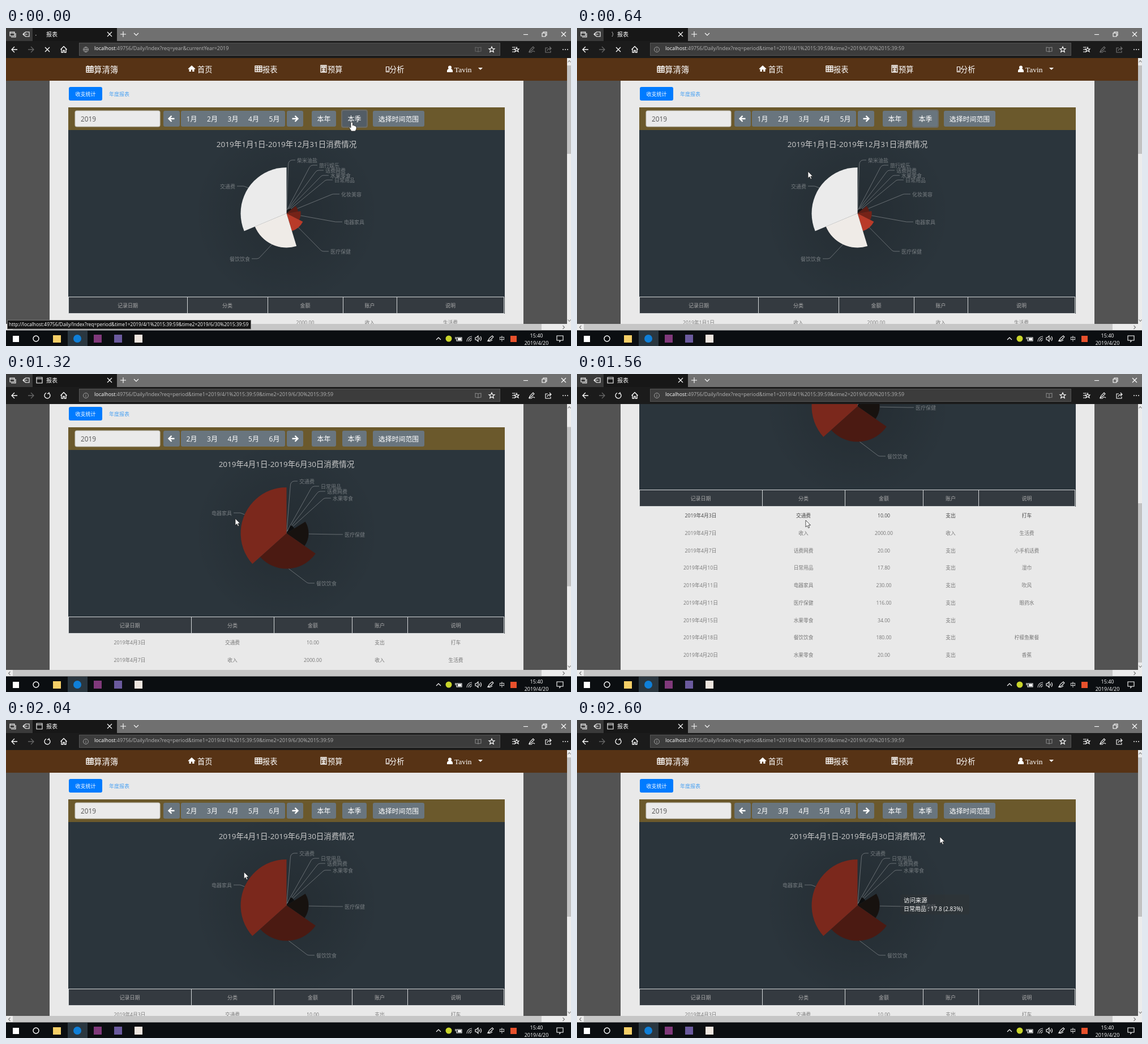
An HTML page with a canvas that plays this animation: 998 by 561 pixels, repeating every 2640 ms.

```html
<!DOCTYPE html>
<html lang="zh-CN">
<head>
<meta charset="utf-8">
<title>报表</title>
<style>
html, body { margin: 0; width: 100%; height: 100%; overflow: hidden; background: #000; }
canvas { display: block; }
</style>
</head>
<body>
<canvas id="stage" width="998" height="561"></canvas>
<script>
const ctx = document.getElementById('stage').getContext('2d');
const LOOP = 2640, LOADED = 880;
const SANS = '"Open Sans", "Noto Sans CJK SC", "Noto Sans CJK", sans-serif';
const SERIF = '"Liberation Serif", serif';
const HOST = 'localhost', PATH = ':49756/Daily/Index?req=';
const PERIOD = 'period&time1=2019/4/1%2015:39:59&time2=2019/6/30%2015:39:59';

// Slice: name, value, colour, label x, label y
const year = {
  title: '2019年1月1日-2019年12月31日消费情况', first: 1, thumb: 156,
  columns: [110, 320, 462, 595, 690, 880],
  rows: ['2019年1月1日 收入 2000.00 收入 生活费'],
  slices: [
    ['柴米油盐', 1.5, '#101214', 514, 233], ['旅行娱乐', 9, '#101214', 553, 242],
    ['话费网费', 11, '#101214', 564, 251], ['水果零食', 13, '#101214', 573, 260],
    ['日常用品', 16.5, '#1a1110', 580, 268], ['化妆美容', 30, '#5c1d15', 592, 293],
    ['电器家具', 36, '#752318', 597, 342], ['医疗保健', 46, '#b93b29', 573, 394],
    ['餐饮饮食', 84.4, '#efebe7', 431, 407], ['交通费', 112.6, '#ebebeb', 405, 279]]
};
const quarter = {
  title: '2019年4月1日-2019年6月30日消费情况', first: 2, thumb: 281,
  columns: [110, 327, 473, 611, 709, 880],
  rows: ['2019年4月3日 交通费 10.00 支出 打车', '2019年4月7日 收入 2000.00 收入 生活费',
    '2019年4月7日 话费网费 20.00 支出 小手机话费', '2019年4月10日 日常用品 17.80 支出 湿巾',
    '2019年4月11日 电器家具 230.00 支出 吹风', '2019年4月11日 医疗保健 116.00 支出 眼药水',
    '2019年4月15日 水果零食 34.00 支出', '2019年4月18日 餐饮饮食 180.00 支出 柠檬鱼聚餐',
    '2019年4月20日 水果零食 20.00 支出 香蕉'],
  slices: [
    ['交通费', 10, '#0c0e10', 518, 235], ['日常用品', 17.8, '#0c0e10', 556, 244],
    ['话费网费', 20, '#0c0e10', 567, 253], ['水果零食', 54, '#0d0e0f', 577, 265],
    ['医疗保健', 116, '#17120f', 598, 329], ['餐饮饮食', 180, '#4b1a12', 548, 415],
    ['电器家具', 230, '#7b281c', 399, 291]],
  delays: [10, 45, 20, 40, 36, 0, 36]
};

// Keyframes: time followed by values
const cursorKeys = [[200, 611, 166], [480, 408, 253], [1200, 408, 253], [1320, 405, 255], [1560, 404, 258],
  [1800, 404, 258], [2040, 420, 268], [2320, 507, 315], [2400, 515, 308], [2600, 641, 206]];
const scrollKeys = [[1240, 0], [1300, 46], [1345, 46], [1490, 270], [1720, 270], [1940, 0]];

function track(keys, t) {
  const next = keys.findIndex(k => k[0] > t);
  if (next < 0) return keys[keys.length - 1].slice(1);
  if (next === 0) return keys[0].slice(1);
  const a = keys[next - 1], b = keys[next], p = (t - a[0]) / (b[0] - a[0]);
  return a.slice(1).map((v, i) => v + (b[i + 1] - v) * p);
}

function elasticOut(k) {
  if (k <= 0) return 0;
  return k >= 1 ? 1 : 1 + 2 ** (-10 * k) * Math.sin((k - .1) * 5 * Math.PI);
}

function rect(x, y, w, h, color, radius = 0) {
  ctx.fillStyle = color;
  ctx.beginPath();
  ctx.roundRect(x, y, w, h, radius);
  ctx.fill();
}

function disc(x, y, r, color) {
  ctx.fillStyle = color;
  ctx.beginPath();
  ctx.arc(x, y, r, 0, 7);
  ctx.fill();
}

// y is the vertical middle of the glyphs
function text(s, x, y, size, color, align = 'center', weight = 400, family = SANS) {
  ctx.font = `${weight} ${size}px ${family}`;
  ctx.textAlign = align;
  ctx.fillStyle = color;
  ctx.fillText(s, x, y + size * .39);
}

function icon(x, y, d, color = '#fff', width = 1.1, fill = false) {
  ctx.save();
  ctx.translate(x, y);
  ctx.strokeStyle = ctx.fillStyle = color;
  ctx.lineWidth = width;
  ctx[fill ? 'fill' : 'stroke'](new Path2D(d));
  ctx.restore();
}

const CROSS = 'M-4-4L4 4M4-4L-4 4';
const ARROW = 'M5 0H-5M0-5L-5 0L0 5';
const ARROW_RIGHT = 'M-5 0H5M0-5L5 0L0 5';
const GRID = 'M-6-5H6V5H-6ZM-6-2H6M-6 1.5H6M-2-5V5M2-5V5';
const STAR = 'M0-5L1.5-1.6L5-1.4L2.3.9L3.2 4.5L0 2.5L-3.2 4.5L-2.3.9L-5-1.4L-1.5-1.6Z';
const HOME = 'M-5.5 0L0-5.5L5.5 0M-4-1V5H-1.2V1.5H1.2V5H4V-1';

function drawNav() {
  rect(0, 53, 991, 40, '#573315');
  icon(148, 73, GRID + 'M-3.5-7V-4M3.5-7V-4', '#fff', 1.3);
  text('算清簿', 155, 73, 14.4, '#fff', 'left', 500);
  icon(328, 72, 'M-6.5 0L0-6L6.5 0L5.5 1L4.5 0V5H1.2V1.5H-1.2V5H-4.5V0L-5.5 1Z', '#fff', 1, true);
  icon(446, 72, GRID, '#fff', 1.3);
  icon(561, 72, 'M-5-6H5V6H-5ZM-3-4H3V-2H-3ZM-3 1H3M-3 4H3M0-1V5', '#fff', 1.3);
  icon(674, 73, 'M-2.5-4.5H2.5V4.5H-2.5ZM-1 2.8H1', '#fff', 1.2);
  [['首页', 338], ['报表', 453], ['预算', 568], ['分析', 677]].forEach(([s, x]) => text(s, x, 72.5, 13.2, '#fff', 'left'));
  disc(784, 69.5, 3, '#fff');
  icon(784, 73, 'M-5 5V2Q-4-1-2-1H2Q4-1 5 2V5Z', '#fff', 1, true);
  text('Tavin', 792, 72.5, 13.5, '#fff', 'left', 400, SERIF);
  icon(838, 72, 'M-4-2H4L0 2Z', '#fff', 1, true);
}

function button(x, w, label, size = 12, color = '#69757e') {
  rect(x, 146, w, 28, color, 3);
  text(label, x + w / 2, 160, size, '#fff');
}

function drawToolbar(page, hover) {
  rect(111, 104, 59, 24, '#007bff', 3);
  text('收支统计', 140.5, 116, 9, '#fff');
  text('年度报表', 182, 116, 9, '#48a0f2', 'left', 300);
  rect(110, 140, 771, 40, '#6b592c');
  rect(121.5, 145.5, 151, 29, '#c5c5c0', 3.5);
  rect(122.5, 146.5, 149, 27, '#eaeaea', 3);
  text('2019', 132, 160, 11.8, '#555', 'left');
  button(278, 29, '');
  icon(292.5, 160, ARROW, '#fff', 2.4);
  button(309, 184, '');
  for (let i = 0; i < 5; i++) text(page.first + i + '月', 328 + i * 36.5, 160, 12, '#fff');
  button(496, 29, '');
  icon(510.5, 160, ARROW_RIGHT, '#fff', 2.4);
  button(540, 43, '本年');
  if (page === year) rect(592, 144, 47, 32, 'rgba(108,117,135,.65)', 4);
  button(594, 43, '本季', 12, hover ? '#535d66' : '#69757e');
  button(648, 91, '选择时间范围', 11.9);
}

function drawChart(page, t) {
  const cx = 495.5, cy = 327, { slices } = page;
  rect(110, 180, 771, 294, '#2b353c');
  const halo = ctx.createRadialGradient(cx, cy, 40, cx, cy, 165);
  halo.addColorStop(0, 'rgba(0,0,0,.13)');
  halo.addColorStop(1, 'rgba(0,0,0,0)');
  rect(320, 180, 350, 294, halo);
  text(page.title, cx, 205, 13.5, '#ccc');

  const values = slices.map(s => s[1]);
  const total = values.reduce((a, b) => a + b), min = values[0], max = values[values.length - 1];
  let angle = -Math.PI / 2;
  const wedges = slices.map(([name, value, color, x, y], i) => {
    const start = angle, radius = (value - min) / (max - min) * 81;
    angle += value / total * 2 * Math.PI;
    const mid = (start + angle) / 2, side = Math.cos(mid) < -.1 ? -1 : 1;
    ctx.strokeStyle = 'rgba(255,255,255,.3)';
    ctx.lineWidth = 1;
    ctx.beginPath();
    ctx.moveTo(cx + radius * Math.cos(mid), cy + radius * Math.sin(mid));
    ctx.arcTo(x - side * 15, y, x - side * 3, y, 7);
    ctx.lineTo(x - side * 3, y);
    ctx.stroke();
    text(name, x, y, 9, 'rgba(255,255,255,.36)', side < 0 ? 'right' : 'left');
    const grow = page.delays ? elasticOut((t - LOADED - page.delays[i]) / 400) : 1;
    return { start, end: angle, radius: radius * grow, color };
  });
  for (const w of wedges) {
    ctx.fillStyle = w.color;
    ctx.beginPath();
    ctx.moveTo(cx, cy);
    ctx.arc(cx, cy, w.radius, w.start, w.end);
    ctx.fill();
  }
}

function drawTable(page, hover) {
  const cols = page.columns, center = i => (cols[i] + cols[i + 1]) / 2;
  rect(110, 474, 771, 30, '#343a40');
  ctx.strokeStyle = '#d4d7d9';
  ctx.lineWidth = 1;
  ctx.strokeRect(110.5, 474.5, 769, 29);
  cols.slice(1, 5).forEach(x => rect(x, 474, 1, 30, '#d4d7d9'));
  ['记录日期', '分类', '金额', '账户', '说明'].forEach((s, i) => text(s, center(i), 489, 9, '#aaa', 'center', 500));
  page.rows.forEach((row, r) => row.split(' ').forEach((s, i) =>
    text(s, center(i), 520 + r * 30.7, 8.7, r === 0 && hover ? '#444' : '#777')));
}

function drawTooltip(t) {
  if (t < 2400) return;
  ctx.globalAlpha = Math.min(1, (t - 2400) / 80);
  rect(571, 308, 122, 35, 'rgba(50,50,50,.35)', 3);
  text('访问来源', 577, 318, 10.4, '#fff', 'left');
  text('日常用品 : 17.8 (2.83%)', 577, 333, 10, '#fff', 'left');
  ctx.globalAlpha = 1;
}

function drawPage(page, t, scroll) {
  ctx.save();
  ctx.beginPath();
  ctx.rect(0, 53, 991, 469);
  ctx.clip();
  rect(0, 53, 991, 469, '#535353');
  ctx.translate(0, -scroll);
  rect(77, 93, 837, 740, '#e9e9e9');
  drawNav();
  drawToolbar(page, t < 260);
  drawChart(page, t);
  drawTable(page, scroll === 270);
  drawTooltip(t);
  ctx.restore();

  rect(991, 53, 7, 480, '#ececec');
  rect(991, 66 + scroll * .6, 7, page.thumb, '#c2c2c2');
  icon(995, 59, 'M-2.5 1.5L0-1.5L2.5 1.5', '#777');
  icon(995, 516, 'M-2.5-1.5L0 1.5L2.5-1.5', '#777');
  rect(0, 522, 998, 11.5, '#ececec');
  rect(12, 522, 934, 11.5, '#c6c6c6');
  icon(6, 528, 'M1.5-3L-1.5 0L1.5 3', '#777');
  icon(985, 528, 'M-1.5-3L1.5 0L-1.5 3', '#777');
}

function drawTabBar(t) {
  rect(0, 0, 998, 23, '#707070');
  rect(0, 0, 47, 23, '#3a3a3a');
  rect(47, 0, 149, 23, '#171717');
  icon(12, 11, 'M-5-4H3V3H-5ZM-3 5H5V-2M-5-2H3');
  icon(36, 11, 'M-2-4H5V4H-2M-2-4V-2M-2 4V2M2 0H-6M-3-3L-6 0L-3 3');
  if (t < 1100) {
    const count = t < 300 ? 1 : t < LOADED ? 4 : 6;
    for (let i = 0; i < count; i++) {
      const a = 2.8 + t / 230 + i * (t < LOADED ? .45 : .95);
      disc(58 + 5.5 * Math.cos(a), 11 + 5.5 * Math.sin(a), .8, '#ccc');
    }
  } else icon(59, 11, 'M-5-5H5V5H-5ZM-5-2.5H5');
  text('报表', 71, 11, 10, '#fff', 'left');
  icon(183, 11, CROSS);
  icon(207, 11, 'M-5 0H5M0-5V5');
  icon(230, 11, 'M-4-2L0 2L4-2');
  icon(918, 11, 'M-4 .5H4');
  icon(951, 11, 'M-4-2H2V4H-4ZM-2-2V-4H4V2H2');
  icon(985, 11, CROSS);
}

function drawAddressBar(t) {
  const loaded = t >= LOADED, started = t >= 320;
  rect(0, 23, 998, 30, '#1b1b1b');
  rect(129, 26, 744, 23, '#555');
  rect(130, 27, 742, 21, '#3c3c3c');
  icon(15, 38, ARROW, '#fff', 1.3);
  icon(44, 38, ARROW_RIGHT, '#666', 1.3);
  icon(73, 38, loaded ? 'M3-4A5 5 0 1 1-2-4.6M3-6V-3.5H0' : CROSS, '#fff', 1.3);
  icon(102, 38, HOME, '#fff', 1.3);
  icon(141, 38, 'M4.5 0A4.5 4.5 0 1 1-4.5 0A4.5 4.5 0 1 1 4.5 0' +
    (started ? 'M0-.5V2.5M0-2.6V-1.6' : 'M-4.5 0H4.5M0-4.5Q-4 0 0 4.5Q4 0 0-4.5'), '#aaa', .9);
  text(HOST, 156, 36, 8.95, '#fff', 'left');
  const hostWidth = ctx.measureText(HOST).width;
  text(PATH + (started ? PERIOD : 'year&currentYear=2019'), 156 + hostWidth, 36, 8.95, '#b4b4b4', 'left');
  icon(834, 38, 'M0-3V4M0-3Q-2-4-5-4V3Q-2 3 0 4Q2 3 5 3V-4Q2-4 0-3', started ? '#888' : '#666');
  icon(858, 38, STAR, '#fff', 1.2);
  icon(900, 38, 'M-6-4H0M-6 0H-1M-6 4H-1M2-4L3-1H6L4 1L5 4L2 2L-1 4L0 1L-2-1H1Z');
  const side = loaded ? '#fff' : '#777';
  icon(929, 38, 'M-5 4L-3 0L2-5L4-3L-1 2ZM-5 5H-1Q2 1 5 4', side);
  icon(958, 38, 'M-1-3H-5V5H4V2M-2 2Q-1-2 5-2M2-5L5-2L2 1', side);
  [-4, 0, 4].forEach(dx => disc(988 + dx, 38, .9, '#fff'));
}

function drawTaskbar() {
  rect(0, 533.5, 998, 28, '#0b0e11');
  rect(109, 534, 35, 27, '#2a3740');
  rect(12, 543, 11, 11, '#fff');
  icon(53, 548, 'M5 0A5 5 0 1 1-5 0A5 5 0 1 1 5 0', '#fff', 1.4);
  rect(83, 542, 14, 13, '#f5cf67');
  disc(126, 548, 7, '#0f7fd8');
  rect(155, 541, 14, 14, '#80397b');
  rect(191, 541, 14, 14, '#6b5a9e');
  rect(227, 541, 14, 14, '#eee6df');
  icon(764, 548, 'M-4 2L0-2L4 2');
  disc(782, 548, 5.5, '#c9d52b');
  icon(800, 549, 'M-4-3H5V3H-4ZM-6-4V0');
  rect(798, 547, 6, 4, '#fff');
  icon(818, 548, 'M-4 5A9 9 0 0 1 5-4M-1 5A6 6 0 0 1 5-1M2 5A3 3 0 0 1 5 2', '#ddd');
  icon(834, 548, 'M-5-2H-3L0-5V5L-3 2H-5ZM2-2Q3.5 0 2 2M4-4Q7 0 4 4');
  icon(856, 548, 'M-5 4L-2-1L3-5L5-3L0 2ZM-5 4Q0 6 3 2');
  text('中', 876, 548, 10, '#fff');
  rect(891, 543, 11, 11, '#e8512c');
  text('15:40', 937, 542, 9, '#fff');
  text('2019/4/20', 937, 555, 9, '#fff');
  icon(978, 548, 'M-5-5H6V3H2L0 5.5V3H-5Z');
}

function drawStatus() {
  rect(2, 515, 431, 16.5, '#777');
  rect(3, 516, 429, 14.5, '#151515');
  text('http://' + HOST + PATH + PERIOD, 5, 523, 8.45, '#fff', 'left');
}

function drawCursor(t) {
  const [x, y] = track(cursorKeys, t);
  const shape = t < 260
    ? 'M-2 1Q0-1 1.5 1V6Q3 4.5 4 6.5Q6 5.5 6.5 7.5Q8 7 8 9V12L6 16H-1L-5 9.5Q-4 8-2 10Z'
    : 'M0 0V12L2.8 9.4L4.7 13.6L6.6 12.8L4.8 8.7H8.5Z';
  icon(x, y, shape, '#fff', 1, true);
  icon(x, y, shape, '#222', .8);
}

function draw() {
  const t = performance.now() % LOOP;
  drawPage(t < LOADED ? year : quarter, t, track(scrollKeys, t)[0]);
  drawTabBar(t);
  drawAddressBar(t);
  drawTaskbar();
  if (t < 280) drawStatus();
  drawCursor(t);
  requestAnimationFrame(draw);
}
draw();
</script>
</body>
</html>
```
